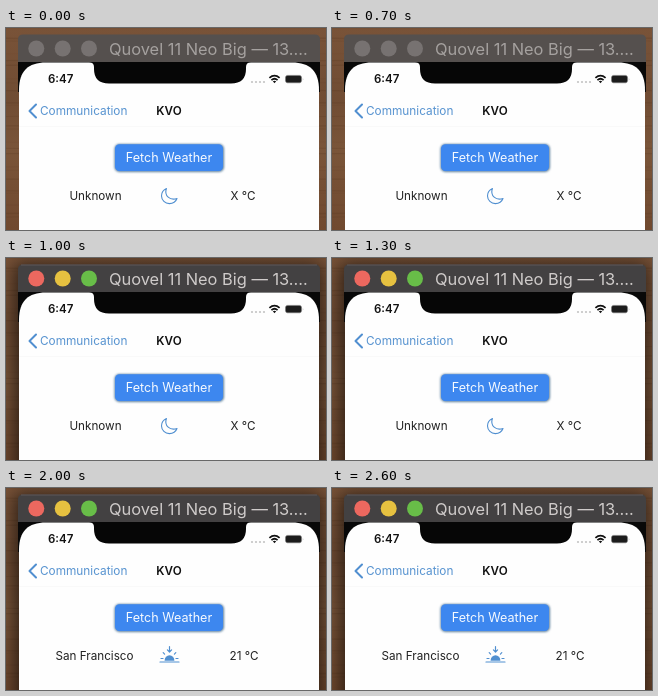
Animation of 320x202 px, one loop 2700 ms. Source, as an HTML page:

```html
<!DOCTYPE html>
<html lang="en">
<head>
<meta charset="utf-8">
<title>Fetch weather</title>
<style>
  html, body { margin: 0; width: 100%; height: 100%; overflow: hidden; background: #70503a; }
  svg { display: block; width: 100vw; height: 100vh; }
  text { font-family: Inter, "Liberation Sans", sans-serif; font-size: 11.7px; fill: #222; }
  .mid { text-anchor: middle; }
  .bold { font-weight: 600; fill: #111; }
  .title { font-size: 16.4px; }
  .line { fill: none; stroke: #508fd0; stroke-linecap: round; stroke-linejoin: round; }
</style>
</head>
<body>
<svg viewBox="0 0 320 202" preserveAspectRatio="none">
  <defs>
    <linearGradient id="wood" x2="0" y2="1">
      <stop offset="0" stop-color="#795338"/>
      <stop offset=".35" stop-color="#704c33"/>
      <stop offset=".6" stop-color="#7a5539"/>
      <stop offset="1" stop-color="#70492f"/>
    </linearGradient>
    <filter id="shadow" x="-15%" y="-15%" width="130%" height="130%">
      <feGaussianBlur stdDeviation="9"/>
    </filter>
    <filter id="edge" x="-5%" y="-20%" width="110%" height="140%">
      <feGaussianBlur stdDeviation=".8"/>
    </filter>
    <path id="bar" d="M12 36V11.5q0-5 5-5H309q5 0 5 5V36Z"/>
  </defs>

  <rect width="320" height="202" fill="url(#wood)"/>
  <g id="grain" fill="none" stroke="#51331f" stroke-opacity=".22"/>

  <rect class="active" x="8" y="5" width="308" height="230" opacity=".6" filter="url(#shadow)"/>

  <!-- Window frame -->
  <g class="inactive">
    <use href="#bar" fill="#55504e"/>
    <g fill="#777271">
      <circle cx="30.3" cy="20.5" r="8"/><circle cx="56.7" cy="20.5" r="8"/><circle cx="83" cy="20.5" r="8"/>
    </g>
    <text class="title" x="103" y="27" style="fill:#a5a19f">Quovel 11 Neo Big — 13....</text>
  </g>
  <g class="active">
    <use href="#bar" fill="#434142"/>
    <path d="M15 7H311" stroke="#686465" stroke-width=".7"/>
    <circle cx="30.3" cy="20.5" r="8" fill="#ec685f"/>
    <circle cx="56.7" cy="20.5" r="8" fill="#e6c140"/>
    <circle cx="83" cy="20.5" r="8" fill="#68bd48"/>
    <text class="title" x="103" y="27" style="fill:#cfcbca">Quovel 11 Neo Big — 13....</text>
  </g>

  <!-- Phone screen -->
  <path d="M12 34H314V64H12Z" fill="#080808"/>
  <path d="M13 202V62C13 43 22 34.5 40 34.5H286C304 34.5 313 43 313 62V202Z" fill="#fefefe"/>
  <path d="M83 34Q88 34.5 88 39V41Q88 55.5 103 55.5H225Q240 55.5 240 41V39Q240 34.5 245 34Z" fill="#060606"/>

  <!-- Status bar -->
  <text class="bold" x="42" y="55" style="font-size:11.5px">6:47</text>
  <g fill="#c4c4c4">
    <circle cx="246" cy="54" r="1.1"/><circle cx="250" cy="54" r="1.1"/>
    <circle cx="254" cy="54" r="1.1"/><circle cx="258" cy="54" r="1.1"/>
  </g>
  <path d="M263.4 49.8Q268.5 45.3 273.6 49.8M265.4 52.1Q268.5 49.4 271.6 52.1" fill="none" stroke="#111" stroke-width="1.7"/>
  <path d="M266.8 53.3Q268.5 52 270.2 53.3L268.5 55.2Z" fill="#111"/>
  <rect x="279.5" y="47.4" width="16" height="7.4" rx="2" fill="#1c1c1c" stroke="#777" stroke-width=".6"/>
  <path d="M296.8 49.9Q298 51.2 296.8 52.5Z" fill="#999"/>

  <!-- Navigation bar -->
  <path class="line" d="M30 76.5L23.5 83L30 89.5" stroke-width="2"/>
  <text x="34" y="87" style="font-size:11.8px;fill:#5793d0">Communication</text>
  <text class="bold mid" x="163" y="87">KVO</text>
  <path d="M13 98.5H313" stroke="#f9f9f9"/>

  <rect x="108.5" y="116" width="109.5" height="28" rx="5" fill="#5b7f9c" filter="url(#edge)"/>
  <rect x="109" y="116.3" width="108" height="26.7" rx="4.5" fill="#3d87ef"/>
  <text class="mid" x="163" y="134" style="font-size:12.6px;fill:#f6faff">Fetch Weather</text>

  <!-- Weather row -->
  <g class="before">
    <text class="mid" x="89.5" y="172">Unknown</text>
    <path class="line" stroke-width="1.1" d="M160.4 160.5C157.3 161.9 155.5 164.8 155.5 168A7.8 7.8 0 0 0 163.4 175.6C167 175.6 169.8 173.7 171 170.5C164.2 172.8 157.8 168 160.4 160.5Z"/>
    <text class="mid" x="237" y="172">X °C</text>
  </g>
  <g class="after">
    <text class="mid" x="88.5" y="172">San Francisco</text>
    <path class="line" stroke-width="1.2" d="M163.5 158.5V163.8M161.4 161.9L163.5 164L165.6 161.9M154 174H173M155 170.5H157M170 170.5H172M157.2 164.7L158.6 166.1M169.8 164.7L168.4 166.1"/>
    <path d="M158.6 172.8A4.9 5.6 0 0 1 168.4 172.8Z" fill="#508fd0"/>
    <text class="mid" x="238" y="172">21 °C</text>
  </g>
</svg>
<script>
  const LOOP = 2700;
  const ACTIVATE = 800;
  const LOADED = 1500;

  // Each part is shown from start to end, with hard cuts.
  const parts = [
    ['.inactive', 0, ACTIVATE],
    ['.active', ACTIVATE, LOOP],
    ['.before', 0, LOADED],
    ['.after', LOADED, LOOP]
  ];

  for (const [selector, start, end] of parts) {
    const visibleAt = time => time >= start && time < end ? 'visible' : 'hidden';
    const steps = [0, start, end, LOOP].map(time => ({
      offset: time / LOOP,
      visibility: visibleAt(time),
      easing: 'steps(1, end)'
    }));
    for (const node of document.querySelectorAll(selector)) {
      node.animate(steps, { duration: LOOP, iterations: Infinity }).startTime = 0;
    }
  }

  const grain = document.getElementById('grain');
  for (let i = 0; i < 26; i++) {
    const y = i * 8 + 3 * Math.sin(i * 2.3);
    const line = document.createElementNS(grain.namespaceURI, 'path');
    line.setAttribute('d', `M0 ${y}Q80 ${y + 2 * Math.sin(i)} 160 ${y}T320 ${y}`);
    line.setAttribute('stroke-width', 0.8 + 0.6 * Math.sin(i * 1.7));
    grain.append(line);
  }
</script>
</body>
</html>
```
